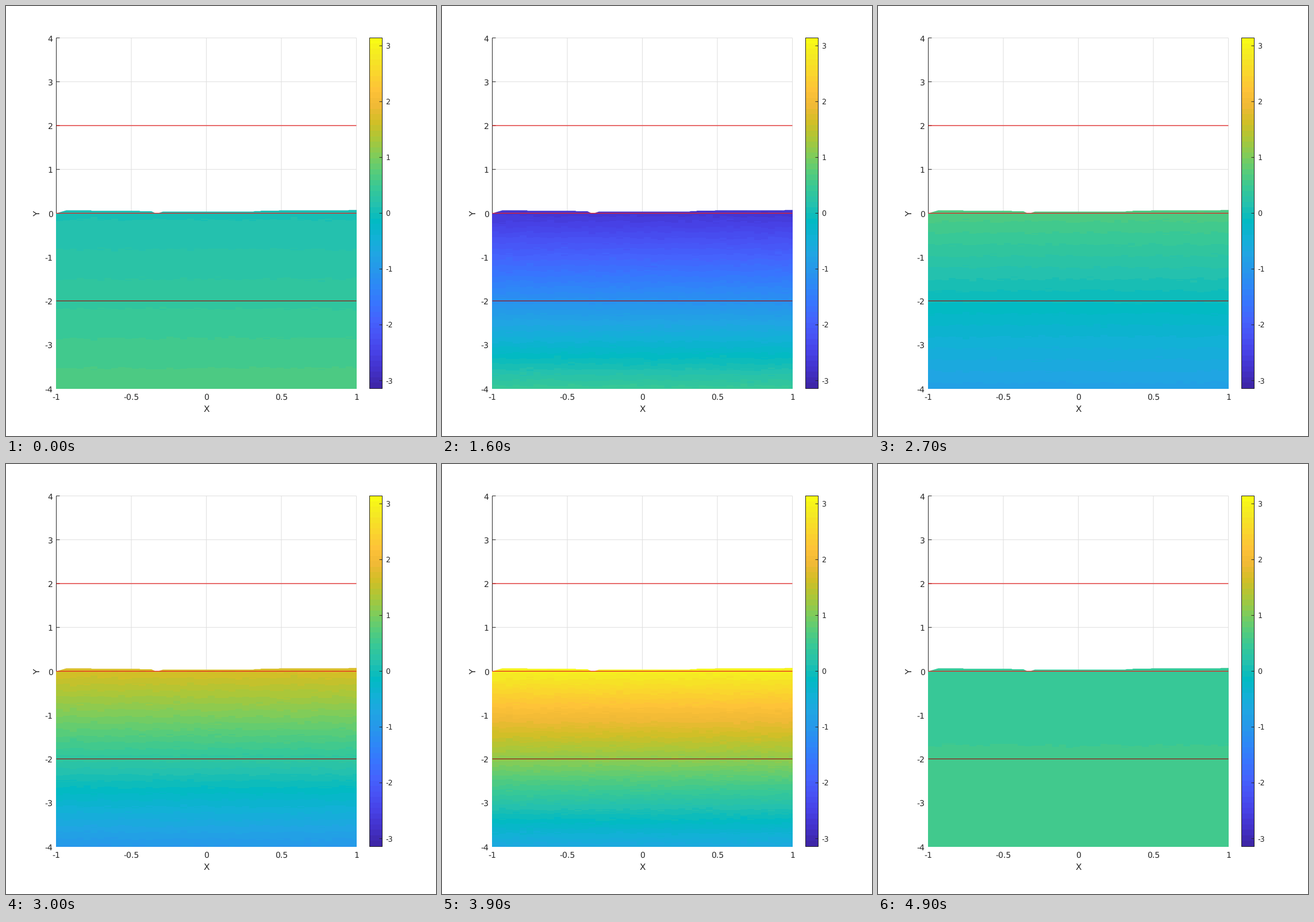
Recreate the animation shown at these times as a matplotlib script. Size 748 px wide and 748 px high, loop 5000 ms.

```python
import numpy as np
import matplotlib.pyplot as plt
from matplotlib.animation import FuncAnimation
from matplotlib.colors import LinearSegmentedColormap
from matplotlib.patches import Polygon

SIZE, DPI = 748, 100
FRAMES, INTERVAL = 50, 100
LEFT, RIGHT, TOP, BOTTOM = 87.5, 609.5, 55.5, 665.5
BAR = (632.5, 654.5, 55.5, 665.5)
FIELD = (87, 610, 352, 666)
DARK, GRID, RED = "#262626", "#dfdfdf", "#e62020"

parula = LinearSegmentedColormap.from_list("parula", [
    "#3E26A8", "#4332CB", "#4741E5", "#4852F4", "#4563FD", "#3875FE",
    "#2E87F7", "#2797EB", "#20A5E3", "#12B1D6", "#02BAC3", "#24C1AE",
    "#37C897", "#57CC7A", "#81CC59", "#ABC739", "#D1BF27", "#F0BA36",
    "#FEC338", "#FAD62D", "#F5E924", "#F9FB15"], N=64)

plt.rcParams["font.family"] = "DejaVu Sans"
plt.rcParams["text.hinting"] = "none"
fig = plt.figure(figsize=(SIZE / DPI, SIZE / DPI), dpi=DPI, facecolor="white")
ax = fig.add_axes([0, 0, 1, 1])
ax.set_xlim(0, SIZE)
ax.set_ylim(SIZE, 0)
ax.axis("off")


def px(x):
    return LEFT + (x + 1) / 2 * (RIGHT - LEFT)


def py(y):
    return TOP + (4 - y) / 8 * (BOTTOM - TOP)


def line(x0, y0, x1, y1, color, z, width=1.0):
    ax.plot([x0, x1], [y0, y1], color=color, lw=width * 72 / DPI, zorder=z,
            solid_capstyle="butt", snap=False)


def label(x, y, text, size, ha="center"):
    ax.text(x, y + 0.365 * size, text, fontsize=size * 72 / DPI, ha=ha,
            va="baseline", color=DARK)


# Grid, axis and tick labels
for x in (-0.5, 0, 0.5, 1):
    line(px(x), TOP, px(x), BOTTOM, GRID, 1)
for y in (1, 2, 3, 4):
    line(LEFT, py(y), RIGHT, py(y), GRID, 1)
    line(LEFT, py(y), LEFT + 6, py(y), DARK, 2)
line(LEFT, TOP, LEFT, py(0), DARK, 2)
for x in (-1, -0.5, 0, 0.5, 1):
    label(px(x), 680, f"{x:g}", 14)
for y in range(-4, 5):
    label(81.5, py(y) + 0.9, str(y), 14, "right")
label(348.5, 700, "X", 15.4)
ax.text(55, 361, "Y", fontsize=15.4 * 72 / DPI, rotation=90, ha="center",
        va="center", color=DARK)

# Colour bar
x0, x1, y0, y1 = BAR
ax.imshow(np.arange(64)[::-1, None], cmap=parula, extent=(x0, x1, y1, y0),
          aspect="auto", interpolation="nearest", zorder=2)
ax.add_patch(plt.Rectangle((x0, y0), x1 - x0, y1 - y0, fill=False,
                           ec=DARK, lw=0.72, zorder=3, snap=False))
for v in range(-3, 4):
    y = (y0 + y1) / 2 - v / (2 * np.pi) * (y1 - y0)
    line(x1 - 5, y, x1, y, DARK, 4)
    label(660.5, y, str(v), 12.6, "left")

# Field sampled per pixel, with slightly ragged level edges
left, right, top, bottom = FIELD
columns, rows = right - left, bottom - top
depth = 4 - (top + np.arange(rows) + 0.5 - TOP) * 8 / (BOTTOM - TOP)
rng = np.random.default_rng(4)
coarse = rng.normal(0, 0.022, (rows // 5 + 1, columns // 12 + 1))
ragged = np.kron(coarse, np.ones((5, 12)))[:rows, :columns]
height = depth[:, None] + ragged

field = ax.imshow(np.zeros((rows, columns)), cmap=parula, vmin=-np.pi,
                  vmax=np.pi, aspect="auto", interpolation="nearest",
                  extent=(left, right, bottom, top), zorder=5)
surface = [
    (left, 361), (94, 358.6), (105, 355.4), (148, 355.4), (149, 356.2),
    (232, 356.2), (234, 357), (253, 357), (259, 360), (262, 361),
    (266, 360), (273, 357.6), (430, 357.6), (433, 356.8), (442, 356.8),
    (444, 356), (474, 356), (476, 355.4), (595, 355.4), (597, 354.8),
    (right, 354.8), (right, bottom), (left, bottom)]
outline = Polygon(surface, fc="none", ec="none")
ax.add_patch(outline)
field.set_clip_path(outline)

for y, color in ((2, RED), (0, RED), (-2, "#961414")):
    line(LEFT, py(y), RIGHT, py(y), color, 6, 1.25)


def update(frame):
    phase = 2 * np.pi * frame / FRAMES
    in_phase = 0.077 - 0.145 * height
    quadrature = -2.95 - 0.937 * height
    field.set_data(in_phase * np.cos(phase) + quadrature * np.sin(phase))
    return (field,)


anim = FuncAnimation(fig, update, frames=FRAMES, interval=INTERVAL,
                     repeat=True, repeat_delay=0, blit=False)
plt.show()
```
